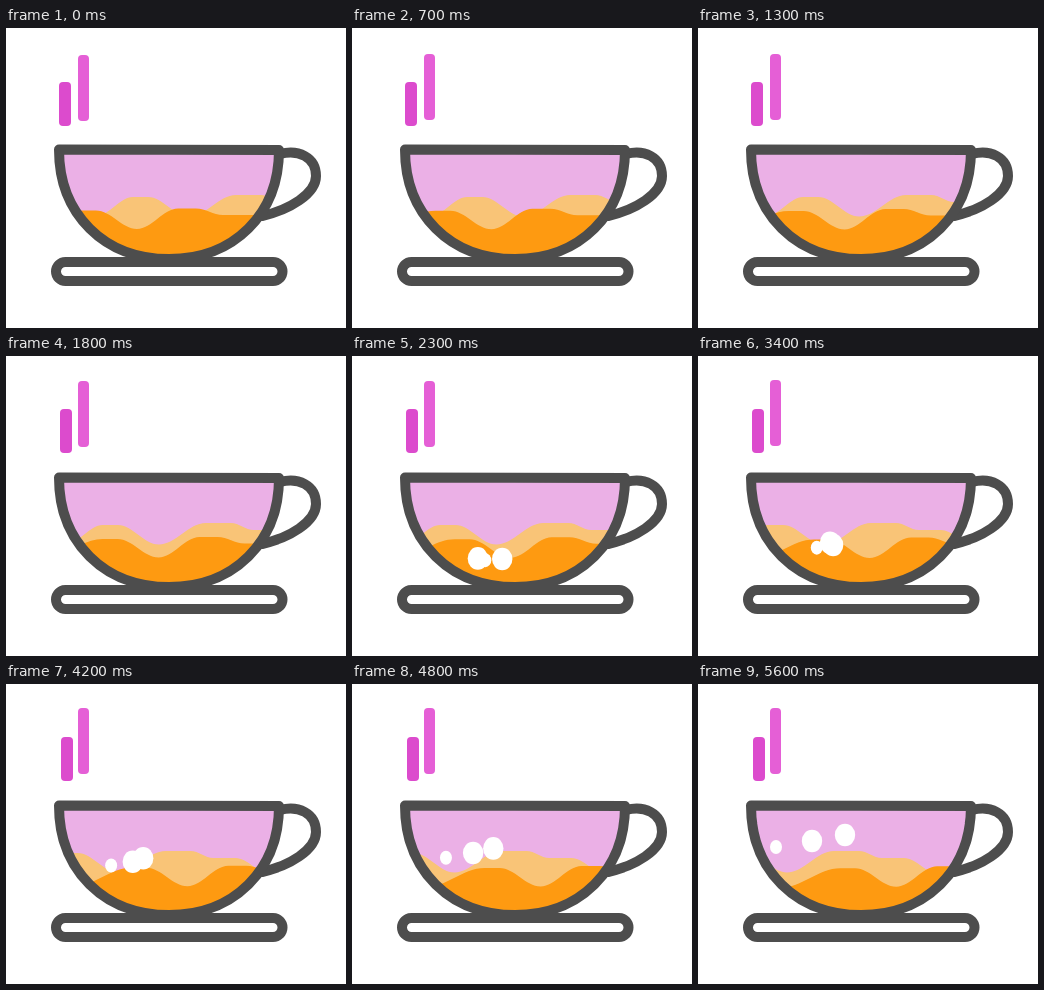
An HTML page for the animation above (5700 ms loop, 340 by 300 pixels).

```html
<!DOCTYPE html>
<html>
<head>
<meta charset="utf-8">
<style>
html, body { margin: 0; width: 100%; height: 100%; overflow: hidden; background: #fff; }
svg { display: block; }
</style>
</head>
<body>
<svg width="340" height="300" viewBox="0 0 340 300">
  <defs>
    <path id="bowl" d="M53 121.5C53 186 98 231 163 231S273 186 273 122Z"/>
    <clipPath id="inside"><use href="#bowl"/></clipPath>
  </defs>
  <rect id="steamA" width="12" height="44" rx="4" fill="#dc4bcd"/>
  <rect id="steamB" x="72" width="11" height="66" rx="4" fill="#e55fd6"/>
  <g clip-path="url(#inside)">
    <use href="#bowl" fill="#ebb0e6"/>
    <path id="back" fill="#f9c477"/>
    <path id="front" fill="#fe9a11"/>
  </g>
  <g id="bubbles" fill="#fff">
    <ellipse rx="6" ry="7"/>
    <ellipse rx="10.2" ry="11.3"/>
    <ellipse rx="10.2" ry="11.3"/>
  </g>
  <g fill="none" stroke="#4d4d4d" stroke-width="10" stroke-linejoin="round" stroke-linecap="round">
    <path d="M274 126C292 121 310 129 310 148C310 166 283 182 256 188"/>
    <use href="#bowl"/>
    <rect x="50" y="234" width="226.5" height="19" rx="9.5" fill="#fff"/>
  </g>
</svg>
<script>
const LOOP = 5700, STEP = 100, RISE_START = 2200, RISE_END = 5600;
const $ = id => document.getElementById(id);
const mix = (a, b, p) => a + (b - a) * p;

// Highs and lows of each wave
const backWave = [[90, 188], [127, 169], [142, 169], [183, 188.5], [230, 167], [255, 167],
  [278, 174], [300, 174], [335, 190]];
const frontWave = [[15, 202], [75, 182.5], [90, 182.5], [131, 201], [172, 180.5], [190, 180.5],
  [217, 187], [270, 187]];

// bend curves the sideways drift
const bubbles = [
  { from: [134, 205], to: [78, 163], bend: 1.25 },
  { from: [153, 204], to: [114, 157], bend: .75 },
  { from: [125.5, 203.5], to: [147, 151], bend: 1.15 }
];

// Joins highs and lows with cosine-like slopes, closed below the cup
function wavePath(pts) {
  const slopes = pts.slice(1).map(([x, y], i) => {
    const [x0, y0] = pts[i];
    return `C${mix(x0, x, .364)} ${y0} ${mix(x0, x, .636)} ${y} ${x} ${y}`;
  });
  return `M${pts[0]}${slopes.join('')}V250H${pts[0][0]}Z`;
}

const move = (el, x, y) => el.setAttribute('transform', `translate(${x} ${y})`);

function draw(now) {
  const t = Math.floor(now % LOOP / STEP) * STEP;
  move($('back'), -t * .0168, 0);
  move($('front'), t * .012, t * .0003);

  // Steam creeps by whole pixels
  move($('steamA'), 53 + Math.floor((t + 700) / 2300), 54 - Math.min(1, Math.floor(t / 1800)));
  move($('steamB'), 0, 27 - Math.min(3, Math.floor((t + 450) / 950)));

  const rise = Math.max(0, (t - RISE_START) / (RISE_END - RISE_START));
  $('bubbles').setAttribute('visibility', t < RISE_START ? 'hidden' : 'visible');
  bubbles.forEach(({ from, to, bend }, i) => move($('bubbles').children[i],
    mix(from[0], to[0], rise ** bend), mix(from[1], to[1], rise ** 1.1)));
}

$('back').setAttribute('d', wavePath(backWave));
$('front').setAttribute('d', wavePath(frontWave));

const start = performance.now();
function tick() {
  draw(performance.now() - start);
  requestAnimationFrame(tick);
}
tick();
</script>
</body>
</html>
```
